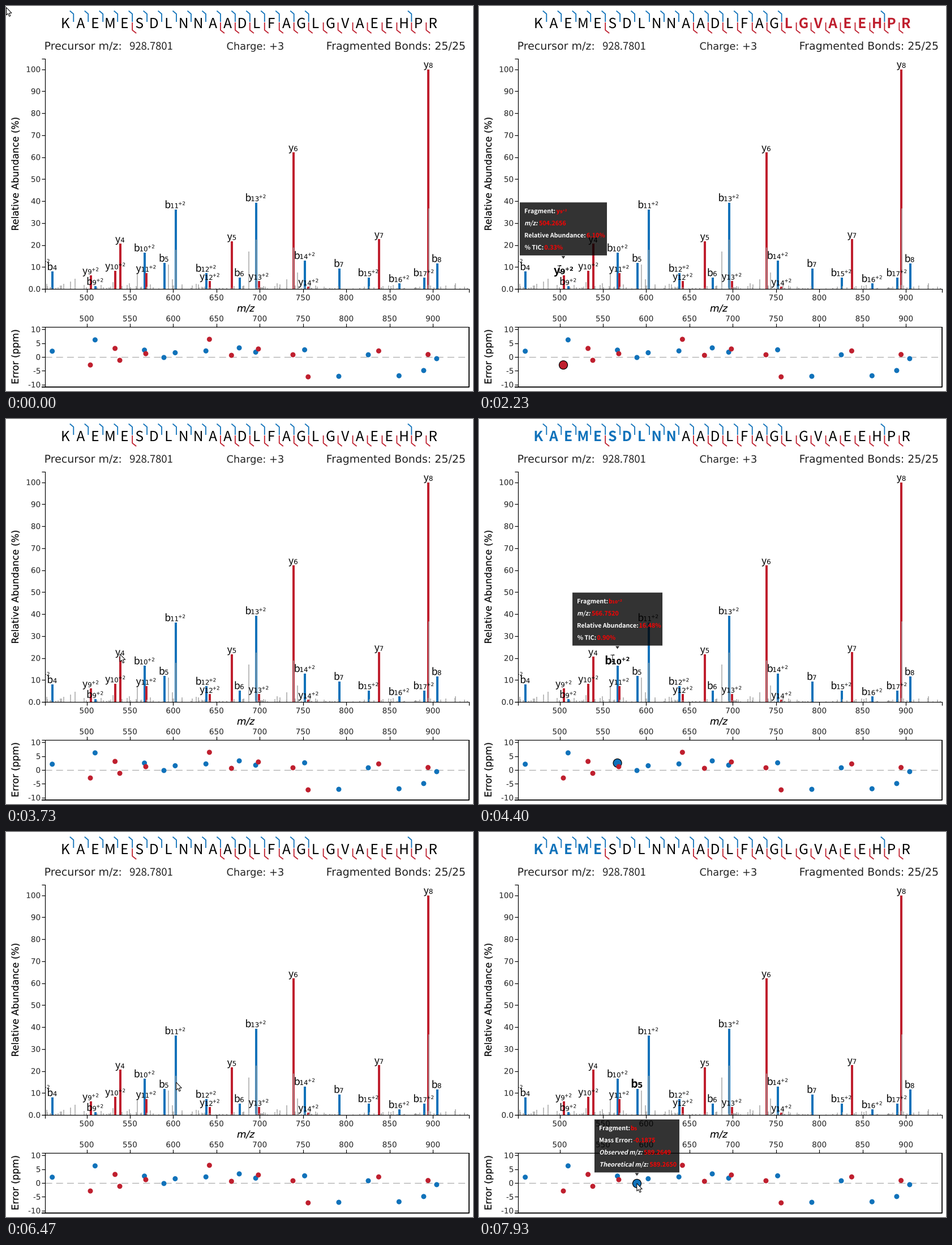
These frames come from a looping animation (825x679 px, 8 s). A matplotlib script:

```python
import numpy as np
import matplotlib.pyplot as plt
from matplotlib.animation import FuncAnimation
from matplotlib.collections import LineCollection, PathCollection
from matplotlib.path import Path
from matplotlib.textpath import TextPath

W, H, DPI = 825, 679, 100
PX = 72 / DPI
LOOP, FRAMES = 8000, 240
BLUE, RED, GRAY, INK = "#1072ba", "#bf1f2e", "#a6a6a6", "#222222"
WIDE, SANS = "DejaVu Sans", "Noto Sans CJK JP"
LEFT, RIGHT, BASE = 68.5, 818, 499
ERR_TOP, ERR_BOTTOM, ERR_ZERO = 565.5, 672, 619

SEQUENCE = "KAEMESDLNNAADLFAGLGVAEEHPR"
MASS = dict(G=57.02146, A=71.03711, S=87.03203, P=97.05276, V=99.06841, L=113.08406,
            N=114.04293, D=115.02694, K=128.09496, E=129.04259, M=131.04049,
            H=137.05891, F=147.06841, R=156.10111)
PROTON, WATER, NEUTRON = 1.00728, 18.01056, 1.00335

# Measured abundance (%) and mass error (ppm) of b4, b5, ... and y4, y5, ...
ABUNDANCE = {
    "b": [7.94, 11.8, 5.2, 9.4, 11.6, 1.2, 16.48, 36.13, 7.2, 39.3, 13, 5.2, 2.5, 5.2],
    "y": [20.52, 21.7, 62.1, 22.6, 100, 6.1, 8.3, 7.2, 3.5, 3.6, 1]}
ERROR = {
    "b": [2.1, -.1875, 3.3, -7, -.6, 6.2, 2.5, 1.5412, 2.2, 1.75, 2.6, .8, -6.8, -4.9],
    "y": [-1.2, .6, .8, 2.2, .9, -2.9, 3.1, 1.2, 6.4, 2.9, -7.2]}


def mz_x(mz):
    return 142.5 + 1.529 * (mz - 500)


def abundance_y(value):
    return BASE - 3.875 * value


def error_y(ppm):
    return ERR_ZERO - 4.87 * ppm


class Ion:
    """A b (from the left) or y (from the right) fragment of the sequence."""

    def __init__(self, kind, number, abundance, error):
        self.kind, self.number = kind, number
        self.abundance, self.error = abundance, error
        self.charge = 2 if number >= 9 else 1
        self.color = BLUE if kind == "b" else RED
        residues = SEQUENCE[:number] if kind == "b" else SEQUENCE[-number:]
        self.mass = sum(MASS[r] for r in residues) + (WATER if kind == "y" else 0)
        self.mz = self.mass / self.charge + PROTON
        self.observed = self.mz * (1 + error * 1e-6)
        self.x, self.top, self.dot_y = mz_x(self.mz), abundance_y(abundance), error_y(error)
        self.bar_x = self.x + .7

    def covers(self, i):
        return i < self.number if self.kind == "b" else i >= len(SEQUENCE) - self.number


IONS = sorted((Ion(kind, 4 + i, *pair) for kind in "by"
               for i, pair in enumerate(zip(ABUNDANCE[kind], ERROR[kind]))),
              key=lambda ion: ion.mz)
ION = {f"{ion.kind}{ion.number}": ion for ion in IONS}

# Pointer moves: start, end, then a free point or the label or dot of an ion
MOVES = [(30, 830, (121, 349)), (900, 1500, ("b4", "label")), (1870, 2300, ("y9", "label")),
         (2500, 2870, (194, 441)), (2870, 3300, (214, 438)), (3530, 3830, ("y4", "label")),
         (4270, 4470, ("b10", "label")), (4700, 5170, ("b11", "label")),
         (6370, 6700, (305, 534)), (6700, 7100, (308, 613)), (7230, 7430, ("b11", "dot")),
         (7700, 7930, ("b5", "dot"))]


def goal_point(goal):
    if goal[1] == "label":
        return ION[goal[0]].bar_x - 4, ION[goal[0]].top - 11
    if goal[1] == "dot":
        return ION[goal[0]].x - 1, ION[goal[0]].dot_y - .5
    return goal


def pointer(t):
    """Tip position and hovered target at a time."""
    tip, state = np.array([0, 2.]), None
    for start, end, goal in MOVES:
        p = np.clip((t - start) / (end - start), 0, 1)
        tip = tip + (np.array(goal_point(goal)) - tip) * (1 - (1 - p) ** 2)
        if p > .2:
            state = goal if p > .6 and goal[1] in ("label", "dot") else None
    return tip, state


def text(s, x, y, size, family=WIDE, color="k", weight="normal", ha="left",
         slant=0, stroke=0, upward=False):
    """Outline of a string, placed by its inked width."""
    glyphs = TextPath((0, 0), s, size=size, prop={"family": family, "weight": weight})
    box = glyphs.get_extents()
    anchor = {"left": box.x0, "center": (box.x0 + box.x1) / 2, "right": box.x1}[ha]
    u, v = glyphs.vertices.T
    u = u - anchor + slant * v
    verts = (x - v, y - u) if upward else (x + u, y - v)
    return Path(np.column_stack(verts), glyphs.codes), color, stroke


def right_edge(item):
    return item[0].get_extents().x1


def ion_label(ion, x, y, size, ha="center", **style):
    """Ion letter with its subscript and raised charge."""
    parts = [(ion.kind, size, SANS, 0), (str(ion.number), size * .67, WIDE, 0)]
    if ion.charge > 1:
        parts.append((f"+{ion.charge}", size * .5, WIDE, -.3 * size))
    items, edge = [], 0
    for s, part_size, family, dy in parts:
        items.append(text(s, edge, y + dy, part_size, family, **style))
        edge = right_edge(items[-1]) + size / 16
    shift = x - (edge / 2 if ha == "center" else 0)
    return [(Path(p.vertices + [shift, 0], p.codes), c, w) for p, c, w in items]


def add_items(items, z):
    paths, colors, strokes = zip(*items)
    return ax.add_collection(PathCollection(
        paths, facecolors=colors, edgecolors=colors, linewidths=strokes, zorder=z,
        snap=False), autolim=False)


def add_lines(segments, color, width, z=1, **kw):
    return ax.add_collection(LineCollection(
        segments, colors=color, linewidths=width * PX, zorder=z, **kw), autolim=False)


def polygon(points):
    return Path(points + points[:1], closed=True)


def lettering(active):
    """Sequence letters and peak labels, with the hovered ion emphasised."""
    items = []
    for i, letter in enumerate(SEQUENCE):
        lit = active is not None and active.covers(i)
        items.append(text(letter, 106 + 25.96 * i, 39, 24.5, SANS,
                          active.color if lit else "k",
                          "bold" if lit else "normal", "center"))
    for ion in IONS:
        size, weight = (19.5, "bold") if ion is active else (17.5, "normal")
        items += ion_label(ion, ion.bar_x, ion.top - 2.5, size, weight=weight)
    return items


def tooltip(ion, place):
    if place == "dot":
        width, bottom = 150, ion.dot_y - 19.5
        rows = [("Mass Error:", f"{ion.error:.4f}"), ("Observed m/z:", f"{ion.observed:.4f}"),
                ("Theoretical m/z:", f"{ion.mz:.4f}")]
    else:
        width, bottom = 159 if ion.abundance >= 10 else 154, ion.top - 35.5
        rows = [("m/z:", f"{ion.observed:.4f}"),
                ("Relative Abundance:", f"{ion.abundance:.2f}%"),
                ("% TIC:", f"{ion.abundance * .0545:.2f}%")]
    x0, x1, top = ion.x - width / 2, ion.x + width / 2, bottom - 93.5
    shade = (0, 0, 0, .8)
    items = [(polygon([(x0, top), (x1, top), (x1, bottom), (x0, bottom)]), shade, 0),
             (polygon([(ion.x - 3.5, bottom + 1), (ion.x + 3.5, bottom + 1),
                       (ion.x, bottom + 6)]), shade, 0)]
    bold = dict(weight="bold")
    for i, (key, value) in enumerate([("Fragment:", None)] + rows):
        y = top + 19 + 21.4 * i
        items.append(text(key, x0 + 9, y, 10.7, SANS, "w",
                          slant=.2 if "m/z" in key else 0, **bold))
        start = right_edge(items[-1]) + 2.5
        if value:
            items.append(text(value, start, y, 10.7, SANS, "red", **bold))
        else:
            items += ion_label(ion, start, y, 10.5, "left", color="red", **bold)
    return items


def draw_bonds():
    blue, red = [], []
    for i in range(len(SEQUENCE) - 1):
        x = 119.3 + 25.96 * i
        if i < 17 or i == 23:
            blue.append([(x - 6.5, 8.5), (x, 14), (x, 28)])
        if i == 4 or i >= 10:
            red.append([(x, 29), (x, 42.5), (x + 7, 48)])
    add_lines(blue, BLUE, 1.8)
    add_lines(red, RED, 1.8)


def draw_axes():
    lines = [[(LEFT - 6, 92.5), (LEFT, 92.5), (LEFT, BASE), (LEFT - 6, BASE)],
             [(LEFT, BASE + 6), (LEFT, BASE), (RIGHT, BASE), (RIGHT, BASE + 6)],
             [(LEFT - 6, ERR_TOP), (RIGHT, ERR_TOP)], [(LEFT, ERR_TOP), (LEFT, ERR_BOTTOM)]]
    items = []
    for mz in range(500, 901, 50):
        x = mz_x(mz)
        lines += [[(x, BASE), (x, BASE + 6)], [(x, ERR_TOP - 6), (x, ERR_TOP)]]
        items += [text(str(mz), x, y, 13.6, ha="center", color=INK) for y in (519, 556)]
    y_ticks = [(str(v or "0.0"), abundance_y(v)) for v in range(0, 101, 10)]
    y_ticks += [(str(e), error_y(e)) for e in range(-10, 11, 5)]
    for label, y in y_ticks:
        lines.append([(LEFT - 6, y), (LEFT, y)])
        items.append(text(label, 60.3, y + 5, 13.6, ha="right", color=INK))
    add_lines(lines, "k", 1.2, 2)
    add_lines([[(LEFT - 6, ERR_BOTTOM), (RIGHT, ERR_BOTTOM), (RIGHT, ERR_TOP)]], "k", 1.8, 2)
    add_lines([[(LEFT, ERR_ZERO), (RIGHT, ERR_ZERO)]], "#aaaaaa", 1.2,
              linestyles=[(0, (10, 6))])
    medium = dict(ha="center", stroke=.12)
    items += [
        text("Relative Abundance (%)", 22, 296, 16.7, upward=True, **medium),
        text("Error (ppm)", 22, 618.5, 16.8, upward=True, **medium),
        text("m/z", 423, 539, 17, slant=.2, **medium),
        text("Precursor m/z:", 69.5, 77, 19, color=INK),
        text("928.7801", 219, 77, 18.4, SANS, INK),
        text("Charge: +3", 390.5, 77, 17.8, color=INK),
        text("Fragmented Bonds: 25/25", 567.5, 77, 19, color=INK),
        text("-2", 69, 453, 9),
    ]
    add_items(items, 3)


def draw_peaks():
    add_lines([[(ion.bar_x, BASE), (ion.bar_x, ion.top)] for ion in IONS],
              [ion.color for ion in IONS], 4)
    # Strong peaks carry an isotope whose share grows with mass
    minor = [(mz_x(ion.mz + NEUTRON / ion.charge), ion.abundance * ion.mass * .00041)
             for ion in IONS if ion.abundance > 25]
    minor += [(mz_x(mz), v) for mz, v in [(486.6, 4.6), (558.5, 7), (594.2, 11),
                                          (687.4, 17), (743.6, 7.5)]]
    rng = np.random.default_rng(7)
    minor += zip(rng.uniform(LEFT + 1, RIGHT, 130), .3 + np.minimum(rng.exponential(.8, 130), 4))
    add_lines([[(x, BASE), (x, abundance_y(v))] for x, v in minor], GRAY, 1.5)


fig = plt.figure(figsize=(W / DPI, H / DPI), dpi=DPI, facecolor="white")
ax = fig.add_axes([0, 0, 1, 1])
ax.set(xlim=(0, W), ylim=(H, 0), autoscale_on=False)
ax.axis("off")

draw_bonds()
draw_peaks()
draw_axes()
dots = ax.scatter([ion.x for ion in IONS], [ion.dot_y for ion in IONS],
                  c=[ion.color for ion in IONS], edgecolors="k", zorder=3)

scenes = {None: [add_items(lettering(None), 4)]}
for *_, goal in MOVES:
    if goal[0] in ION:
        hovered = ION[goal[0]]
        scenes[goal] = [add_items(lettering(hovered), 4),
                        add_items(tooltip(hovered, goal[1]), 6)]

ARROW = np.array([(0, 0), (0, 13.5), (3, 10.8), (5.2, 15.8), (7.4, 14.8),
                  (5.2, 10), (9.5, 10)]) + .5
SERIF = np.array([(-3, 6), (-.5, 6), (0, 5.5), (.5, 6), (3, 6), (.5, 6), (0, 5.5)])
IBEAM = np.vstack([SERIF, SERIF[::-1] * [1, -1]])
arrow, = ax.fill(*ARROW.T, fc="w", ec="k", lw=PX, zorder=7)
ibeam, = ax.plot(*IBEAM.T, color=INK, lw=PX, zorder=7)


def update(frame):
    tip, state = pointer(frame * LOOP / FRAMES)
    for key, artists in scenes.items():
        for artist in artists:
            artist.set_visible(key == state)
    lit = np.array([state is not None and ion is ION[state[0]] for ion in IONS])
    dots.set_sizes((np.where(lit, 15, 9) * PX) ** 2)
    dots.set_linewidths(np.where(lit, 1.2 * PX, 0))

    on_text = state is not None and state[1] == "label"
    arrow.set_visible(not on_text)
    ibeam.set_visible(on_text)
    arrow.set_xy(ARROW + tip)
    ibeam.set_data(*(IBEAM + tip).T)
    return arrow, ibeam, dots


anim = FuncAnimation(fig, update, frames=FRAMES, interval=LOOP / FRAMES,
                     repeat=True, repeat_delay=0, blit=False)
plt.show()
```
